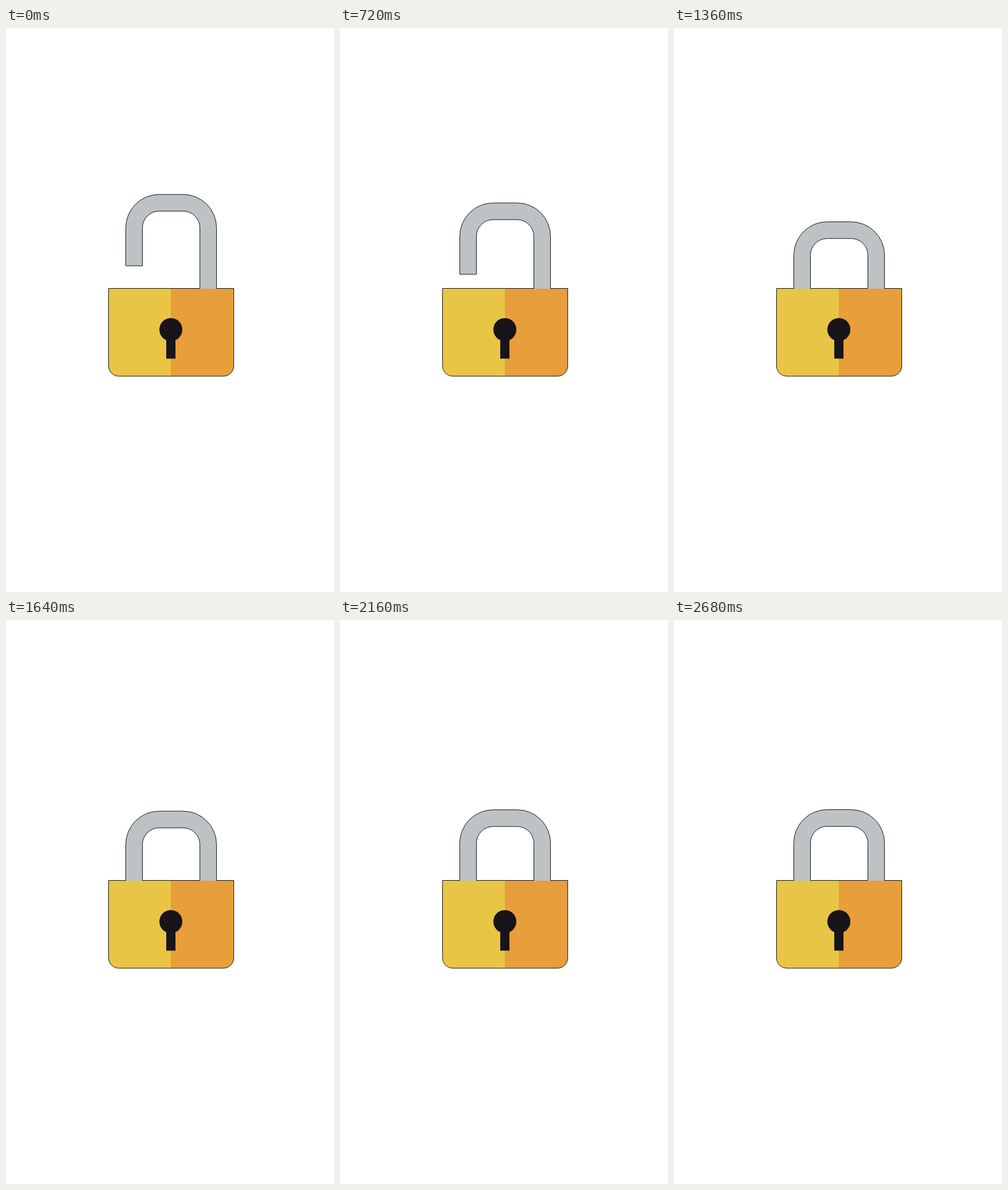
Recreate the animation shown at these times as an HTML page. Size 571x980 px, loop 2720 ms.

```html
<!DOCTYPE html>
<html lang="en">
<head>
<meta charset="utf-8">
<title>Padlock</title>
<style>
  html, body { margin: 0; width: 100%; height: 100%; overflow: hidden; background: #fff; }
  svg { display: block; width: 571px; height: 980px; }
</style>
</head>
<body>
<svg viewBox="0 0 571 980">
  <clipPath id="above"><rect width="571" height="453"/></clipPath>
  <path fill="#e9c545" d="M178.5 452.5H287V605H196.500a18 18 0 0 1-18-18z"/>
  <path fill="#e79e3b" d="M287 452.5H396.500V587a18 18 0 0 1-18 18H287z"/>
  <path fill="none" stroke="#111" d="M178.500 452.500H396.500V587a18 18 0 0 1-18 18H196.500a18 18 0 0 1-18-18z"/>
  <g fill="#18141a">
    <circle cx="287" cy="524" r="20"/>
    <rect x="279" y="535" width="16" height="39.500"/>
  </g>
  <g clip-path="url(#above)">
    <path id="shackle" fill="#bdc2c4" stroke="#111"
      d="M208.500 124V58a58 58 0 0 1 58-58H308.500a58 58 0 0 1 58 58V200H337.500V58a29 29 0 0 0-29-29H266.500a29 29 0 0 0-29 29V124z"/>
  </g>
</svg>
<script>
const LOOP = 2720, STEP = 40;
const OPEN = 289.2, PRESSED = 347.2, REST = 329.5;
const START = 490, HIT = 965;
const shackle = document.getElementById('shackle');

// Snap down past the rest height, then settle back without oscillating.
function shackleTop(t) {
  if (t <= START) return OPEN;
  if (t < HIT) {
    const u = ((t - START) / (HIT - START)) ** 1.5;
    return OPEN + (PRESSED - OPEN) * (1 - Math.cos(Math.PI * u)) / 2;
  }
  const s = (t - HIT) * 0.005;
  return REST + (PRESSED - REST) * (1 + s) * Math.exp(-s);
}

function draw() {
  const t = Math.floor(performance.now() % LOOP / STEP) * STEP;
  shackle.setAttribute('transform', `translate(0 ${shackleTop(t).toFixed(2)})`);
  requestAnimationFrame(draw);
}
draw();
</script>
</body>
</html>
```
